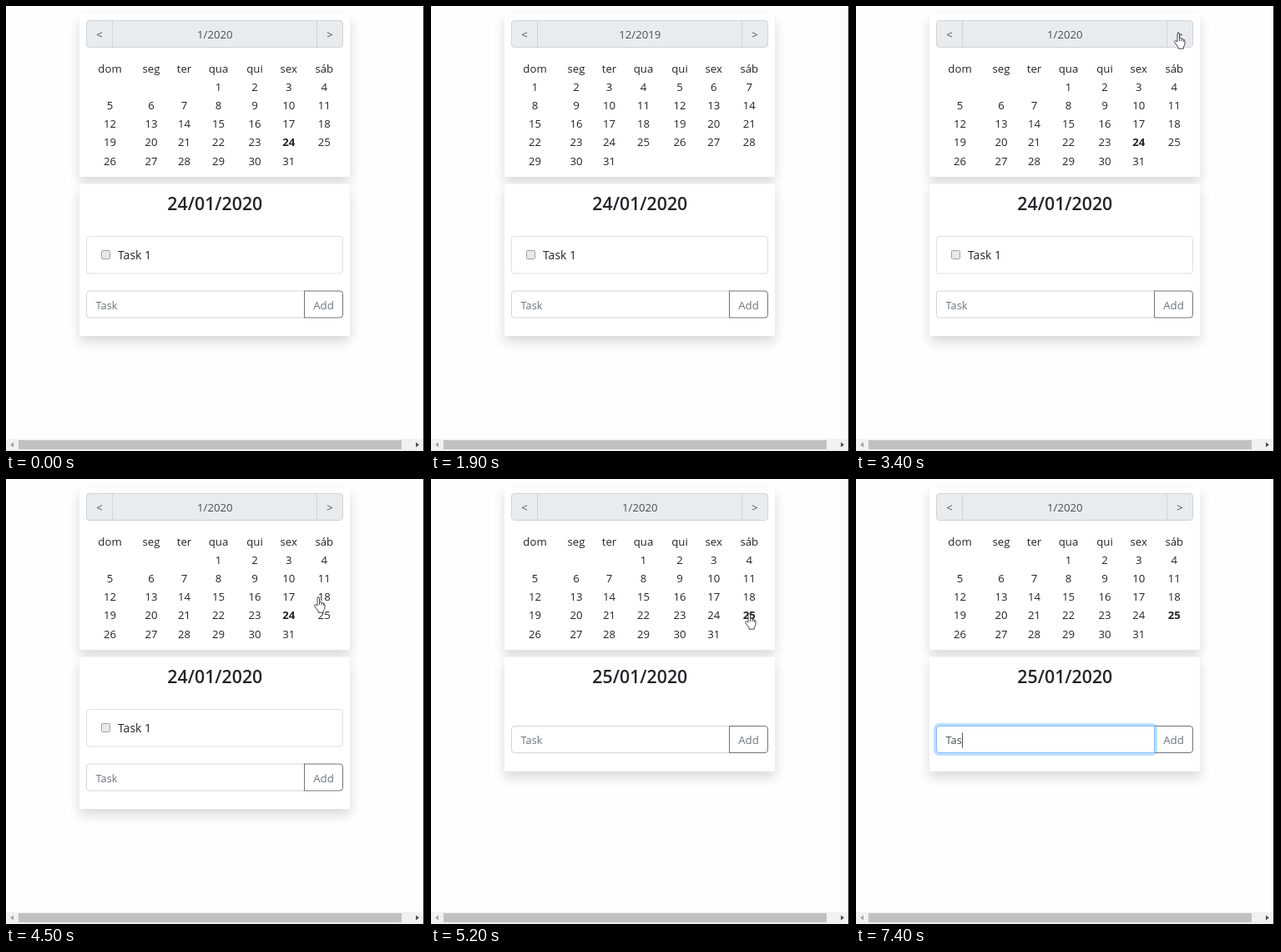
These frames come from a looping animation (502 px wide and 534 px high, 8 s). An HTML page with a canvas:

```html
<!DOCTYPE html>
<html lang="pt">
<head>
<meta charset="utf-8">
<title>Calendar tasks</title>
<style>
html, body { margin: 0; width: 100%; height: 100%; overflow: hidden; background: #fff; }
canvas { display: block; width: 502px; height: 534px; }
</style>
</head>
<body>
<canvas id="stage" width="502" height="534"></canvas>
<script>
const ctx = document.getElementById('stage').getContext('2d');
const LOOP = 8000, STEP = 100;
const FONT = '"Open Sans", "Noto Sans", sans-serif';
const DAYS = ['dom', 'seg', 'ter', 'qua', 'qui', 'sex', 'sáb'];
const COLS = [124.5, 174, 213.5, 254.5, 298, 338.7, 381.3];

// Pointer path: time, x, y, shape; each entry holds until the next.
const PATH = [
  [0], [300, 340, 140, 'arrow'], [400, 431, 83, 'arrow'],
  [600, 330, 50, 'arrow'], [700, 190, 26, 'arrow'], [800, 238, 64, 'arrow'],
  [1200, 140, 27, 'arrow'], [1300],
  [2400, 261, 122, 'arrow'], [2500, 290, 76, 'arrow'], [2600, 320, 42, 'arrow'],
  [2700, 343, 27, 'arrow'], [2800, 360, 25, 'arrow'], [2900, 378, 29, 'hand'],
  [3000, 381, 32, 'hand'], [4000, 381, 38, 'hand'], [4100, 380, 54, 'arrow'],
  [4200, 376, 78, 'hand'], [4300, 372, 104, 'hand'], [4400, 370, 127, 'hand'],
  [4500, 369, 141, 'hand'], [4600, 371, 150, 'hand'], [4700, 374, 157, 'hand'],
  [4800, 376, 160, 'hand'], [4900, 376, 161, 'hand'],
  [5300, 362, 196, 'arrow'], [5400, 335, 238, 'arrow'], [5500, 300, 280, 'arrow'], [5600]
];

function text(str, x, y, size, color, align = 'center', weight = 400) {
  ctx.font = `${weight} ${size}px ${FONT}`;
  ctx.textAlign = align;
  ctx.fillStyle = color;
  ctx.fillText(str, x, y);
}

function box(x, y, w, h, r, fill, stroke, line = 1) {
  ctx.beginPath();
  ctx.roundRect(x, y, w, h, r);
  if (fill) { ctx.fillStyle = fill; ctx.fill(); }
  if (stroke) { ctx.strokeStyle = stroke; ctx.lineWidth = line; ctx.stroke(); }
}

function rect(x, y, w, h, fill) {
  ctx.fillStyle = fill;
  ctx.fillRect(x, y, w, h);
}

function card(y, h) {
  ctx.save();
  ctx.shadowColor = 'rgba(0,0,0,.15)';
  ctx.shadowBlur = 14;
  ctx.shadowOffsetY = 7;
  box(88, y, 324, h, 1, '#fff');
  ctx.restore();
}

function calendar(title, first, bold) {
  card(9.5, 195.5);
  box(96.5, 17.5, 307, 32, 3.5, '#e9ecef', '#ced4da');
  rect(127, 18, 1, 31, '#ced4da');
  rect(372, 18, 1, 31, '#ced4da');
  text('<', 112, 39, 13, '#495057');
  text(title, 250.3, 39, 13.2, '#495057');
  text('>', 388, 39, 13, '#495057');
  DAYS.forEach((d, i) => text(d, COLS[i], 79.5, 13.2, '#212529'));
  for (let d = 1; d <= 31; d++) {
    const i = first + d - 1;
    const y = 101.8 + Math.floor(i / 7) * 22.2;
    text(d, COLS[i % 7], y, 13.2, '#212529', 'center', d === bold ? 700 : 400);
  }
}

function taskBox() {
  box(96.5, 276.5, 307, 44.5, 3.5, '#fff', '#dfdfdf');
  box(114.5, 293.5, 10, 10, 1, '#e9e9e9', '#a0a0a0');
  text('Task 1', 134, 304, 14, '#212529', 'left');
}

function inputRow(y, typed, focus, caret) {
  box(357.5, y, 46, 32, [0, 3.5, 3.5, 0], '#fff', '#6c757d');
  text('Add', 380.5, y + 21.5, 13.3, '#6c757d');
  if (focus) {
    const g = 2.9 * focus;
    box(96 - g, y - 0.5 - g, 262 + 2 * g, 33 + 2 * g, 3.5 + g, `rgba(0,123,255,${0.25 * focus})`);
  }
  const mix = (a, b) => Math.round(a + (b - a) * focus);
  const border = `rgb(${mix(206, 128)},${mix(212, 189)},${mix(218, 255)})`;
  box(96.5, y, 261, 32, [3.5, 0, 0, 3.5], '#fff', border);
  if (!focus) rect(357, y - 0.5, 1, 33, '#6c757d');
  text(typed || 'Task', 107.5, y + 21.5, 12.8, typed ? '#495057' : '#6c757d', 'left');
  if (caret) {
    const w = typed ? ctx.measureText(typed).width : 0;
    rect(Math.round(107.3 + w), y + 8, 1, 18, '#495057');
  }
}

function scrollbar() {
  rect(0, 519.5, 502, 14.5, '#f1f1f1');
  rect(15, 521, 459, 11, '#c1c1c1');
  const tri = (x, dir, color) => {
    ctx.beginPath();
    ctx.moveTo(x + 2 * dir, 526.5);
    ctx.lineTo(x - 2 * dir, 523.5);
    ctx.lineTo(x - 2 * dir, 529.5);
    ctx.fillStyle = color;
    ctx.fill();
  };
  tri(7, -1, '#a3a3a3');
  tri(493, 1, '#505050');
  rect(500, 0, 2, 534, '#111');
}

const SHAPES = {
  arrow: new Path2D('M.5.5V13.2L3.4 10.5 5.6 15.6 7.8 14.7 5.7 9.7H9.4Z'),
  hand: new Path2D('M4 11V2Q4 .5 5.2.5T6.5 2V6.5Q8.8 5.6 9 7.4 11 6.6 11.3 8.4 13 8 13 10V13Q13 15.5 11.3 17V19.2H5V17.3L1 12Q-.2 10 1.6 9.6 2.8 9.6 4 11Z')
};
const CREASES = new Path2D('M6.5 6.5V10M9 7.5V10.2M11.3 8.4V10.8');

function pointer(t) {
  const [, x, y, kind] = PATH.findLast(p => p[0] <= t);
  if (!kind) return;
  ctx.save();
  ctx.translate(x, y);
  ctx.fillStyle = '#fff';
  ctx.strokeStyle = '#333';
  ctx.lineWidth = 0.9;
  ctx.lineJoin = 'round';
  ctx.fill(SHAPES[kind]);
  ctx.stroke(SHAPES[kind]);
  if (kind === 'hand') ctx.stroke(CREASES);
  ctx.restore();
}

function draw(time) {
  const t = Math.floor(time / STEP) * STEP;
  const back = t >= 1900 && t < 3400;
  const picked = t >= 5100;
  const typed = 'Tas'.slice(0, [7100, 7300, 7400].filter(k => t >= k).length);
  const focus = Math.min(1, Math.max(0, (t - 5960) / 300));
  const caret = t >= 6000 && (t < 6500 || t >= 7000);

  rect(0, 0, 502, 534, '#fefefe');
  calendar(back ? '12/2019' : '1/2020', back ? 0 : 3, back ? 0 : picked ? 25 : 24);
  card(213.5, picked ? 137.5 : 182.5);
  text(picked ? '25/01/2020' : '24/01/2020', 250.3, 244.5, 21.3, '#212529', 'center', 600);
  if (!picked) taskBox();
  inputRow(picked ? 296.5 : 342, typed, focus, caret);
  scrollbar();
  pointer(t);
}

function tick() {
  draw(performance.now() % LOOP);
  requestAnimationFrame(tick);
}
tick();
</script>
</body>
</html>
```
